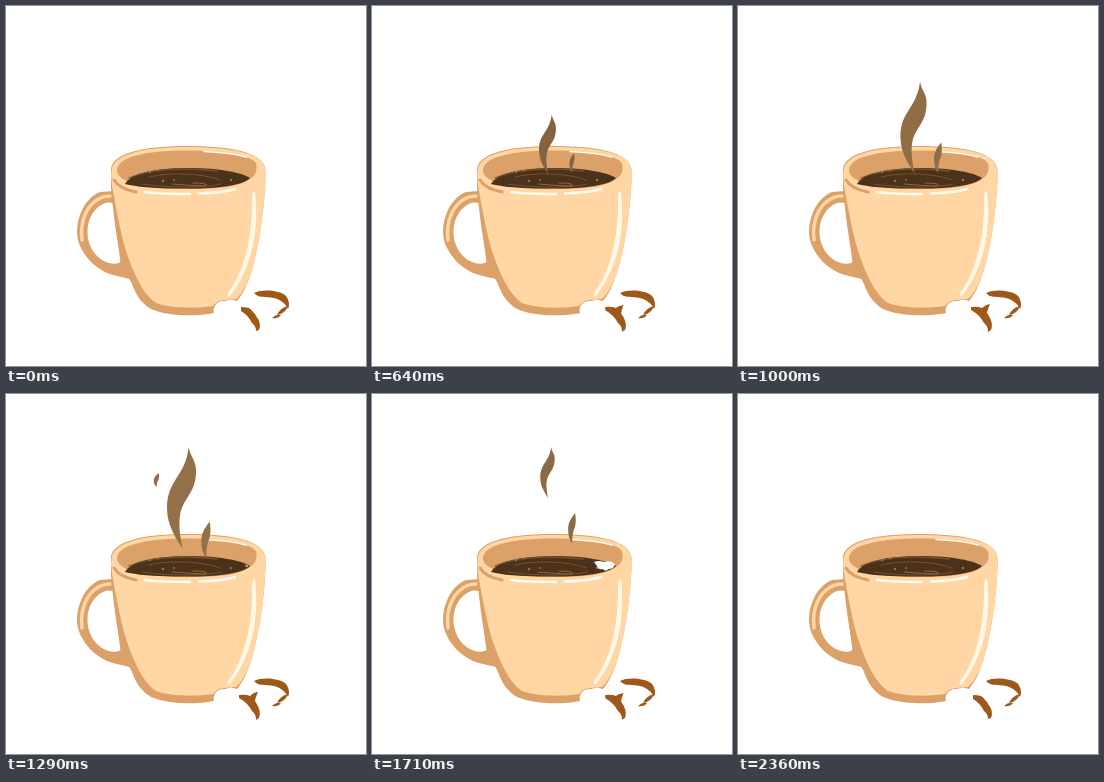
An HTML page that plays this animation: 360 by 360 pixels, repeating every 2430 ms.

```html
<!DOCTYPE html>
<html lang="en">
<head>
<meta charset="utf-8">
<title>Coffee cup</title>
<style>
  html, body { margin: 0; width: 100%; height: 100%; overflow: hidden; background: #fff; }
  svg { display: block; width: 100vw; height: 100vh; }
  .line { fill: none; stroke-linecap: round; stroke-linejoin: round; }
  .light { fill: #ffd6a4; }
  .shade { fill: #dca168; }
  .crumb { fill: #9e591a; }
</style>
</head>
<body>
<svg viewBox="0 0 360 360">
  <!-- handle -->
  <path class="shade" fill-rule="evenodd" d="M107 185L94 186C86 189 78 197 74 209C70 220 70 231 74 240C79 251 88 261 101 267C109 270 117 271 124 273L120 250ZM107 197C97 194 87 203 83 215C79 228 83 242 91 250C98 257 107 259 113 257Q115 256 114 253Z"/>
  <path class="line" stroke="#ffd6a4" stroke-width="3.500" d="M104 190C92 190 83 199 79 209C75 218 75 225 76 234"/>

  <!-- body -->
  <path class="shade" d="M105 166C103 149 132 140 180 140C225 140 258 146 259.500 164C260 195 253 242 245 267C241 279 237 288 231 295L225 293.500L219 295C212 294 206 300 208 307C190 311 160 310 145 303C135 297 130 289 126 278C123 270 119 271 116 257C110 231 107 204 105 182Z"/>
  <path class="light" d="M105 168L259.500 164C260 195 253 242 245 267C241 279 235 289 230 293L219 294Q211 294 207 300C187 303 163 302 150 297C136 288 125 262 118 238C112 215 109 195 106 180Z"/>

  <!-- rim -->
  <path class="light" d="M105.500 167C104 150 132 141 180 141C225 141 258 147 259 163C258 178 230 188 183 188C140 188 108 183 105.500 167Z"/>
  <path class="shade" d="M111 166C109 151 140 144.500 181 144.500C222 144.500 249 150 250.500 159C251 166 249 170 244 173C233 181 211 183 183 183C149 183 116 180 111 166Z"/>
  <path fill="#4b321b" d="M119 178C125 167 150 162 182 162C215 162 237 167 244 172C236 180 211 182.500 183 182.500C151 183 131 181 119 178Z"/>
  <g class="line" stroke="#765130">
    <path stroke-width="1.300" d="M123 172C143 163 178 161 211 165"/>
    <path d="M143 171C162 166 197 167 214 174M136 178C160 182 200 182 215 178"/>
    <path stroke="#8f683d" d="M166 178C178 179 193 180 200 180Q203 177 187 177"/>
  </g>
  <g fill="#9a7144">
    <circle cx="144" cy="166" r="1.200"/><circle cx="152" cy="164.500" r="1"/>
    <circle cx="157" cy="175" r="1.200"/><circle cx="168" cy="174" r="1"/>
    <circle cx="225" cy="174" r="1.200"/>
  </g>
  <path class="line" stroke="#dca168" stroke-width="3" d="M108 174C112 181 120 184 130 186"/>
  <g class="line" stroke="#fffaf0">
    <path stroke-width="1.600" d="M198 145.500C214 146 229 148 240 151"/>
    <path stroke-width="2.400" d="M139 186C153 188 170 188 184 188M193 187.500C207 187 219 186 229 183"/>
  </g>
  <path fill="#fff8e6" d="M249 186C253 219 248 260 224 290C222 292 221 289 222 287C240 264 247 226 246 190Q247 184 249 186Z"/>

  <path id="gap" fill="#fff" d="M222 168Q226 166 232 168Q239 166 243 170Q242 175 237 175Q233 178 231 175Q226 176 225 172Z"/>

  <!-- pieces beside the cup -->
  <path id="shard" class="crumb"/>
  <path class="crumb" d="M248 287C255 283 272 284 279 289C283 293 284 299 282 303C280 298 275 294 268 292C260 290 253 293 248 287Z"/>
  <path class="crumb" d="M271 309Q274 302 282 300Q279 308 271 309ZM266 312Q270 308 275 309Q272 313 266 312Z"/>

  <g id="steam"></g>
</svg>
<script>
const LOOP = 2430, STEPS = 34;
const $ = id => document.getElementById(id);

// outlines in a unit box
const PLUME = "M.75 0C.8 .1 1.02 .13 1 .25C.98 .45 .6 .49 .46 .65C.38 .77 .46 .88 .54 1C.36 .92 0 .78 0 .6C0 .32 .62 .3 .75 0Z";
const LEAF = "M.9 0C1.05 .25 1 .42 .75 .55C.55 .7 .5 .88 .55 1C.2 .95 0 .75 0 .5C.1 .25 .5 .15 .9 0Z";

// tip rises steadily to its peak; the tail lets go later and speeds up
const wisps = [
  { shape: PLUME, x: 175.5, base: 168, peak: 53, born: 0, rise: 6.6, leave: 13, pull: .53, ratio: .285 },
  { shape: LEAF, x: 200, base: 167, peak: 119, born: 0, rise: 2.2, leave: 13, pull: .15, ratio: .26 },
  { shape: LEAF, x: 150.5, base: 97, peak: 70, born: 15, rise: 6, leave: 16, pull: 1, ratio: .4 }
];

for (const w of wisps) {
  w.el = document.createElementNS("http://www.w3.org/2000/svg", "path");
  w.el.setAttribute("d", w.shape);
  $("steam").appendChild(w.el);
}

function place(el, visible, transform) {
  el.setAttribute("visibility", visible ? "visible" : "hidden");
  el.setAttribute("transform", transform);
}

function draw(s) {
  const swell = Math.sin(Math.PI * s / 36);
  const mix = (a, b) => Math.round(a + (b - a) * swell);
  $("steam").setAttribute("fill", `rgb(${mix(92, 148)},${mix(68, 112)},${mix(46, 72)})`);

  for (const w of wisps) {
    const top = Math.max(w.peak, w.base - w.rise * Math.max(0, s - w.born));
    const end = w.base - w.pull * Math.max(0, s - w.leave) ** 2;
    const h = Math.max(0, end - top), width = h * w.ratio;
    place(w.el, h > 1, `translate(${w.x - width / 2} ${top}) scale(${width} ${h})`);
  }

  // a lobe grows out of the shard and sinks back
  const b = Math.sqrt(Math.max(0, Math.sin(Math.PI * s / (STEPS - 1))));
  $("shard").setAttribute("d",
    `M${235 - 2 * b} 301Q${239 + b} ${301 - b} ${243 + b} 302Q${246 + 2 * b} ${304 - 6 * b} ${248 + 4 * b} ${307 - 9 * b}` +
    `Q${250 - b} ${309 - 4 * b} ${250 - b} ${310 - 3 * b}Q256 317 253 324L250 ${325 + b}Q250 320 246 317Q242 309 ${235 - 2 * b} ${305 - b}Z`);

  const g = Math.max(0, 1 - Math.abs(s - 24) / 7);
  place($("gap"), g > .05, `translate(242 172) scale(${g}) translate(-242 -172)`);
}

const start = performance.now();
function tick() {
  const t = (performance.now() - start) % LOOP;
  draw(Math.min(STEPS - 1, Math.floor((t + 5) * STEPS / LOOP)));
  requestAnimationFrame(tick);
}
tick();
</script>
</body>
</html>
```
